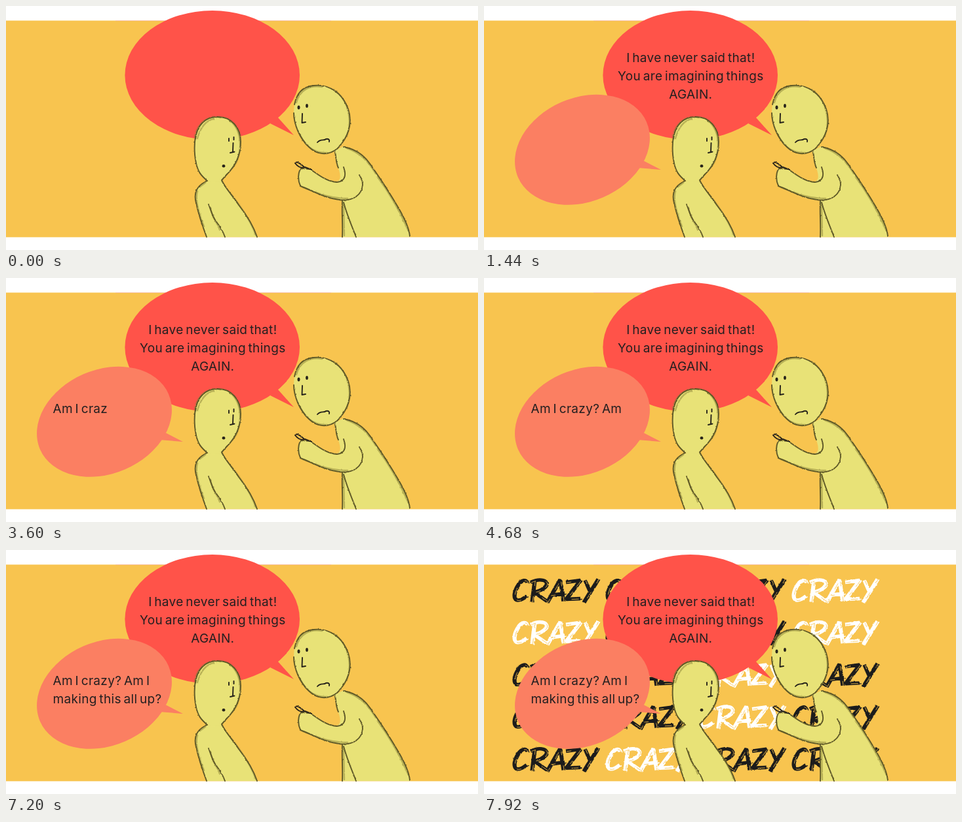
An HTML page that plays this animation: 720 px wide and 374 px high, repeating every 8000 ms.

```html
<!DOCTYPE html>
<html lang="en">
<head>
<meta charset="utf-8">
<title>Two speech bubbles</title>
<style>
  html, body { margin: 0; width: 100%; height: 100%; overflow: hidden; background: #fff; }
  svg { display: block; width: 100vw; height: 100vh; }
  text { font: 19px Inter, Lato, sans-serif; letter-spacing: .33px; word-spacing: -2px; fill: #231f20; }
  .mid { text-anchor: middle; }
  .skin { fill: #e8e277; }
  .pencil { fill: none; stroke: #5f5928; stroke-width: 1.9; stroke-linecap: round; stroke-linejoin: round; }
  .soft { stroke: #8a8237; stroke-width: 2.4; opacity: .5; }
  .ink { stroke: #26231a; }
  .brush { fill: none; stroke-width: 5.4; stroke-linejoin: bevel; }
  .bristle { stroke-width: 1.3; stroke-dasharray: 15 3 9 2; }
  .gap { stroke: #f8c44f; stroke-width: .8; stroke-dasharray: 7 16 11 9; }
</style>
</head>
<body>
<svg viewBox="0 0 720 374" preserveAspectRatio="none">
  <defs>
    <filter id="rough" x="-5%" y="-5%" width="110%" height="110%">
      <feTurbulence type="fractalNoise" baseFrequency=".25" numOctaves="2" seed="4"/>
      <feDisplacementMap in="SourceGraphic" scale="2.2" xChannelSelector="R" yChannelSelector="G"/>
    </filter>
    <path id="letters" d="M24 9 C23 3 15 4 10 12 C4 21 2 31 7 35 C12 37 18 33 23 29
      M35 6 L31 38 M29 8 C44 1 58 5 52 14 C48 19 41 22 34 23 L54 37
      M54 39 C61 27 68 14 74 4 L79 37 M59 28 L81 25
      M83 8 L105 5 L83 34 L105 33
      M112 5 L119 21 M132 3 C125 15 117 27 110 39"/>
    <g id="word" class="brush">
      <use href="#letters"/>
      <use href="#letters" class="bristle" x="2.8" y="1"/>
      <use href="#letters" class="gap" x="1.2" y=".5"/>
    </g>
  </defs>

  <rect y="22.4" width="720" height="332" fill="#f8c44f"/>
  <rect x="167" y="22" width="329" height="1" fill="#f8c2a4"/>

  <g id="words" filter="url(#rough)"></g>

  <g fill="#ff5349">
    <ellipse cx="314.7" cy="106" rx="133.3" ry="99"/>
    <path d="M403 180 L439 198 L414 170Z"/>
  </g>
  <g id="reply" fill="#fb7f62">
    <ellipse rx="106.8" ry="79.6" transform="translate(150 220.3) rotate(-23.5)"/>
    <path d="M243 237 L270 251 L234 248Z"/>
  </g>

  <g id="listener">
    <path class="skin" d="M306 269 C291 275 286 287 290 302 C294 320 300 338 306 354 L383 354 C377 335 364 316 353 302 C344 289 335 279 329 267Z"/>
    <path class="skin" d="M320 170 C343 167 357 185 358 207 C359 231 348 247 338 257 C332 263 328 270 319 270 C309 272 302 265 296 255 C286 237 287 213 290 197 C293 181 305 171 320 170Z"/>
    <g filter="url(#rough)">
      <path class="pencil soft" d="M288 199 C293 178 309 167 327 171 M292 203 C296 186 306 175 317 173 M342 176 C362 192 361 232 345 249
        M292 284 C288 296 294 317 302 338 M343 288 C359 308 372 327 381 351 M296 277 L304 271 M312 309 C314 325 322 331 326 343"/>
      <path class="pencil" d="M289 204 C291 182 305 170 322 170 C344 169 358 187 358 208 C358 231 348 247 337 258 L329 267
        C335 280 346 291 355 305 C366 319 377 336 383 354
        M289 200 C286 219 288 240 294 253 C298 261 303 264 307 268 C291 275 286 287 290 302 C294 320 300 338 306 354"/>
      <path class="pencil" d="M309 304 C312 311 314 320 319 328 C325 336 331 345 334 354"/>
    </g>
    <path class="pencil ink" d="M340 203 L340 207 M347.500 201 L347.500 205 M346.500 210 L346 223 M342 225 L348.500 223.500"/>
    <ellipse cx="332" cy="245.300" rx="2.400" ry="2.200" fill="#26231a"/>
  </g>

  <g id="speaker">
    <path class="skin" d="M501 222 C503 232 503 240 507 248 C510 258 512 266 505 269 C490 269 478 260 465 250 L450 248 C445 254 445 267 449 276 C467 284 486 296 513 298 L514 354 L616 354 C615 341 607 324 599 310 C585 286 572 266 560 249 C549 232 536 221 515 215Z"/>
    <path class="skin" d="M465 123 C494 118 514 135 522 158 C530 183 520 205 505 219 C492 230 474 228 462 216 C448 203 440 183 439 165 C439 145 446 127 465 123Z"/>
    <g filter="url(#rough)">
      <path class="pencil soft" d="M443 148 C448 128 464 121 482 124 M500 128 C524 145 528 178 520 199 M446 192 C455 214 470 226 490 225
        M520 218 C541 225 553 239 564 257 M528 220 L550 235 M566 261 C584 285 600 313 614 345 M453 278 C475 286 491 295 521 295 M515 303 L516 352"/>
      <path class="pencil" d="M440 151 C444 133 452 124 469 122 C494 119 514 135 522 158 C530 182 520 204 505 219 C491 230 474 228 462 216 C448 203 439 181 439 164
        M515 216 C538 220 550 233 560 249 C572 266 585 286 599 310 C607 324 615 340 616 353
        M502 224 C504 233 503 240 507 248 M515 247 C520 261 516 269 505 270 C489 269 477 259 464 250
        M464 250 L450 249 C445 255 445 267 449 276 C466 282 484 294 508 297 C530 300 543 289 544 274 C544 267 542 264 539 259
        M513 299 C512 318 514 336 513 354 M515 301 C520 320 527 336 534 354"/>
      <path class="pencil ink" d="M441 241 C443 237 450 242 455 247 C450 249 445 246 441 241 M456 247 L466 251"/>
    </g>
    <path class="pencil ink" d="M452 165 L451.500 179 L457 178 M475 209 C480 203 485 207 488 204 C492 203 494 205 493 208"/>
    <g fill="#26231a"><ellipse cx="446.500" cy="155.500" rx="2" ry="3"/><ellipse cx="459" cy="153" rx="1.900" ry="3"/></g>
  </g>

  <g id="claim" class="mid">
    <text x="315.3" y="86.3">I have never said that!</text>
    <text x="315.3" y="114.3">You are imagining things</text>
    <text x="315.3" y="142.3">AGAIN.</text>
  </g>
  <text id="doubt" x="71.5" y="207"></text>
  <text id="doubt2" x="71.5" y="235"></text>
</svg>

<script>
const LOOP = 8000, BEAT = 360;
const byId = id => document.getElementById(id);
const show = (el, on) => el.setAttribute('visibility', on ? 'visible' : 'hidden');

// 1 marks a word that turns white
const whiteWords = ['0001', '1001', '0010', '0010', '0100'];
const words = whiteWords.flatMap((row, r) => [...row].map((flag, c) => {
  const el = document.createElementNS('http://www.w3.org/2000/svg', 'use');
  el.setAttribute('href', '#word');
  el.setAttribute('x', 42 + c * 142);
  el.setAttribute('y', 41.5 + r * 64.7);
  byId('words').append(el);
  return { el, white: flag === '1' };
}));

// Beats on which each successive piece of the reply is typed
const firstLine = [[5, 'Am'], [6, 'Am I'], [7, 'Am I c'], [8, 'Am I cr'], [9, 'Am I cra'], [10, 'Am I craz'],
  [11, 'Am I crazy'], [12, 'Am I crazy?'], [13, 'Am I crazy? Am'], [14, 'Am I crazy? Am I']];
const secondLine = [[15, 'making'], [16, 'making this'], [17, 'making this all'], [18, 'making this all up?']];
const typed = (steps, beat) => steps.reduce((text, [start, next]) => beat >= start ? next : text, '');

const claimLines = [...byId('claim').children];
let lastBeat = -1;

function draw(beat) {
  claimLines.forEach((line, i) => show(line, beat > i));
  claimLines[2].style.fontWeight = beat === 3 ? 700 : 400;
  show(byId('reply'), beat >= 4);
  byId('doubt').textContent = typed(firstLine, beat);
  byId('doubt2').textContent = typed(secondLine, beat);
  show(byId('words'), beat >= 21);
  for (const { el, white } of words) el.setAttribute('stroke', white && beat >= 22 ? '#fff' : '#1f1d1b');
}

function tick() {
  const beat = Math.floor(performance.now() % LOOP / BEAT);
  if (beat !== lastBeat) draw(lastBeat = beat);
  requestAnimationFrame(tick);
}
tick();
</script>
</body>
</html>
```
